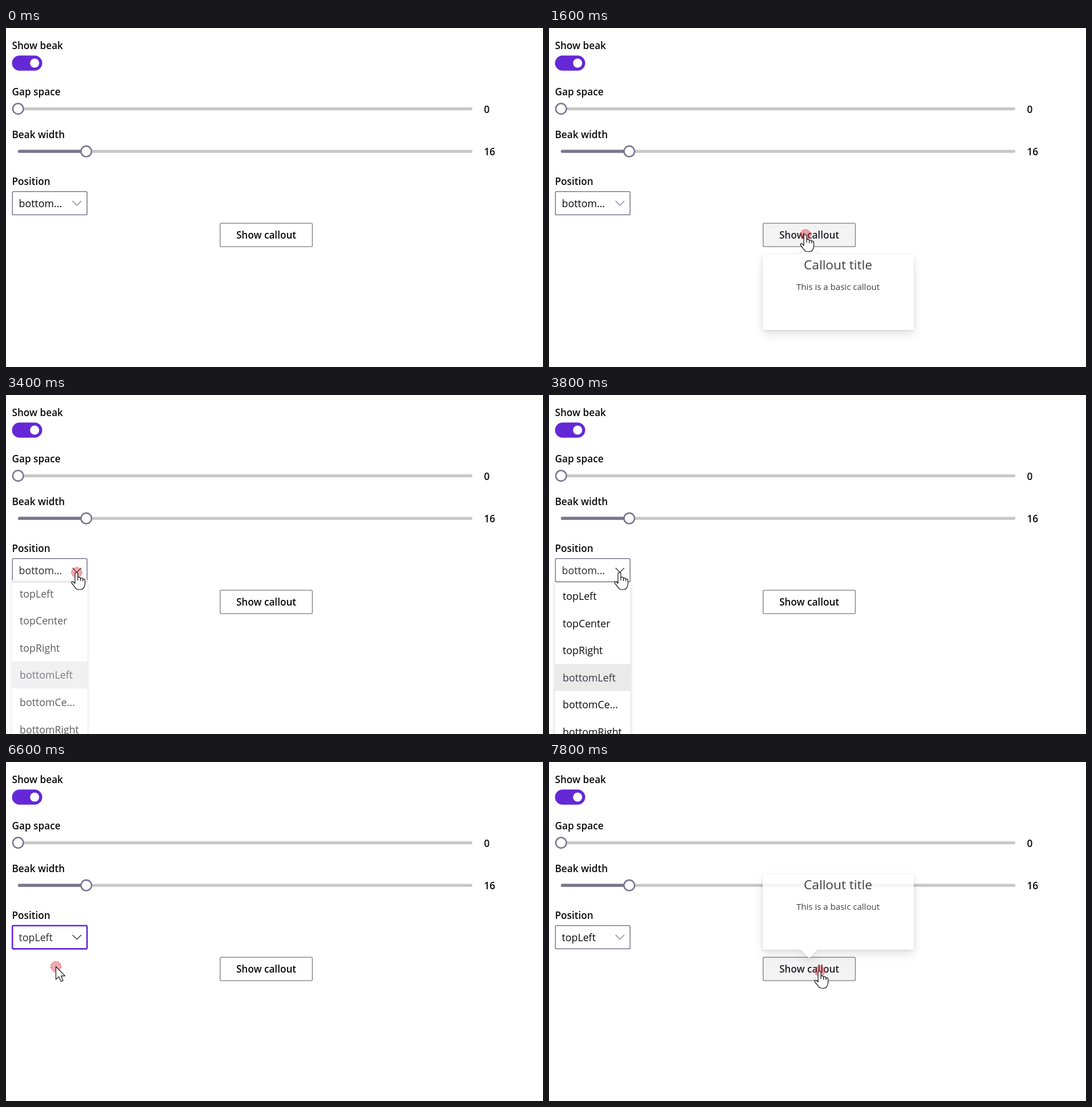
Write an HTML page that moves like this. It is 942 px wide and 594 px high and loops after 8000 ms.

```html
<!DOCTYPE html>
<html lang="en">
<head>
<meta charset="utf-8">
<title>Callout demo</title>
<style>
  html, body { margin: 0; height: 100%; overflow: hidden; background: #fff; }
  svg { display: block; font: 17.8px "Open Sans", "Noto Sans", sans-serif; fill: #0a0a0a; }
  .label { font-size: 17.2px; font-weight: 600; }
  .title { font-size: 22.65px; fill: #1c1b1f; }
  .body { font-size: 15.05px; fill: #1c1b1f; }
  .middle { text-anchor: middle; }
  .track { stroke: #c8c8c8; stroke-width: 5.3; stroke-linecap: round; }
  .filled { stroke: #79758f; }
  .thumb { fill: #fff; stroke: #79758f; stroke-width: 2.6; }
  .cursor { fill: #fff; stroke: #111; stroke-width: 1.2; stroke-linejoin: round; }
  #list { filter: drop-shadow(0 3px 3px rgba(0,0,0,.14)) drop-shadow(0 0 1px rgba(0,0,0,.14)); }
  #callout { filter: drop-shadow(0 8px 9px rgba(0,0,0,.13)) drop-shadow(0 1px 2px rgba(0,0,0,.12)); }
</style>
</head>
<body>
<svg width="942" height="594" viewBox="0 0 942 594">
  <g class="label">
    <text x="10.5" y="37">Show beak</text>
    <text x="10.5" y="118.3">Gap space</text>
    <text x="10.5" y="193">Beak width</text>
    <text x="10.5" y="274.5">Position</text>
    <text x="838.5" y="148.7">0</text>
    <text x="838.5" y="223.3">16</text>
  </g>

  <rect x="10.5" y="48.3" width="53" height="26.4" rx="13.2" fill="#6428d6"/>
  <circle cx="50.2" cy="61.5" r="8" fill="#fff"/>

  <path class="track" d="M23.5 141.6H815.5M23.5 216.2H815.5"/>
  <path class="track filled" d="M23.5 216.2H141"/>
  <circle class="thumb" cx="21.2" cy="141.6" r="9.3"/>
  <circle class="thumb" cx="140.8" cy="216.2" r="9.3"/>

  <rect id="box" x="11.2" y="286.7" width="131" height="40.7" rx="2" fill="#fff"/>
  <text id="value" x="22.5" y="314"></text>
  <path id="chevron" d="M116.8 303L124.4 310.6L132 303" fill="none" stroke-width="1.2"/>

  <rect id="button" x="375.6" y="342.1" width="161.8" height="41" rx="2" stroke="#7b7980" stroke-width="1.3"/>
  <text id="caption" class="label middle" x="456.5" y="369.3">Show callout</text>

  <g id="list"><rect x="10.5" y="328.2" width="132.5" height="290" fill="#fff"/></g>

  <g id="callout">
    <rect x="375" width="265" height="132.5" rx="2" fill="#fff"/>
    <path id="beak" fill="#fff"/>
    <text class="title middle" x="507" y="26">Callout title</text>
    <text class="body middle" x="507" y="62.5">This is a basic callout</text>
  </g>

  <g id="pointer">
    <circle id="click" r="9" fill="#dc1e2d" fill-opacity=".38" stroke="#d83c48" stroke-dasharray="3 2"/>
    <path id="arrow" class="cursor" d="M0 0V22.5L5.2 17.6L9 26L12.6 24.4L9 16.3H16Z"/>
    <path id="hand" class="cursor" d="M-3 2.5Q-3 0 -.5 0T2 2.5V9Q2.5 8 4.5 8.2Q6.5 8.5 6.5 10.5Q7 9.3 9 9.6Q10.8 10 10.8 12Q11.5 11 13 11.6Q14.5 12.2 14.5 14V20Q14.5 24 12.5 26.5Q11 30 5 30Q-1 30 -3 26Q-5 23 -8 19.5Q-10 17 -8.5 16Q-6.5 15 -3 19ZM2 9V14M6.5 10.5V15M10.8 12V15.5M-3 19V12"/>
  </g>
</svg>
<script>
const LOOP = 8000, STEP = 200, ROW = 47.6;
const $ = id => document.getElementById(id);
const set = (id, attrs) => { for (const k in attrs) $(id).setAttribute(k, attrs[k]); };
const show = (id, on) => set(id, { visibility: on ? "visible" : "hidden" });
const within = (t, from, to) => t >= from && t < to;

$("list").innerHTML += ["topLeft", "topCenter", "topRight", "bottomLeft", "bottomCe...", "bottomRight"]
  .map((name, i) => {
    const y = 328.4 + i * ROW;
    return `<rect id="row${i}" x="10.5" y="${y}" width="132.5" height="${ROW}" fill="${i === 3 ? "#eaeaea" : "#fff"}"/>
      <text x="24" y="${y + 30.6}" fill="${i === 3 ? "#3b3a45" : "#0a0a0a"}">${name}</text>`;
  }).join("");

// Pointer path: time, x, y
const path = [
  [200, 928, 277], [400, 800, 296], [600, 645, 328], [800, 510, 347], [1000, 442.5, 349.5], [1200, 450, 362],
  [2400, 450, 362], [2600, 327, 345], [2800, 215, 327], [3000, 142, 314], [3200, 124, 311],
  [5000, 124, 311], [5200, 104.5, 341], [5400, 87.5, 358.5],
  [6600, 87.5, 358.5], [6800, 185, 362], [7000, 365, 366], [7200, 475, 366.5], [LOOP, 475, 366.5]
];

function pointerAt(t) {
  const i = Math.max(1, path.findIndex(p => p[0] >= t));
  const [t0, x0, y0] = path[i - 1], [t1, x1, y1] = path[i];
  const k = Math.max(0, (t - t0) / (t1 - t0));
  return [x0 + (x1 - x0) * k, y0 + (y1 - y0) * k];
}

// Popups slide 26 px into place while fading in
const eased = (t, start) => 1 - (1 - Math.min(1, Math.max(0, (t - start) / 367))) ** 6.5;
function slideIn(id, t, start, y, from) {
  const rest = 1 - eased(t, start);
  set(id, { transform: `translate(0 ${y + from * rest})`, opacity: Math.max(0, 1 - 2 * rest) });
}

function render(now) {
  const t = Math.floor(now % LOOP / STEP) * STEP;
  const [x, y] = pointerAt(t);
  const listOpen = within(t, 3312, 6400), picked = t >= 6400;
  const focused = within(t, 6400, 7400);
  const onButton = t > 0 && x > 375 && x < 538 && y > 342 && y < 384;
  const onBox = x > 11 && x < 143 && y > 286 && y < 328;
  const onRow = listOpen && x < 143 && y > 328;

  show("pointer", t >= 200);
  set("pointer", { transform: `translate(${x} ${y})` });
  const hand = onButton || onBox || onRow;
  show("hand", t >= 200 && hand);
  show("arrow", t >= 200 && !hand);
  show("click", within(t, 1400, 1800) || [3200, 6200, 7400].some(c => within(t, c, c + 600)));

  set("button", { fill: onButton ? "#f3f3f3" : "#fff" });
  set("caption", { fill: onButton ? "#24232a" : "#0a0a0a" });
  set("box", { stroke: focused ? "#6428d6" : "#64617c", "stroke-width": focused ? 2.6 : 1.3 });
  set("chevron", { stroke: onBox || focused ? "#24232a" : "#79758f" });
  set("value", { fill: onBox || focused ? "#2c2b33" : "#0a0a0a" });
  $("value").textContent = picked ? "topLeft" : "bottom...";

  show("list", listOpen);
  slideIn("list", t, 3312, 0, -26);
  set("row0", { fill: onRow ? "#f3f3f3" : "#fff" });

  const above = t >= 7685;
  show("callout", above || within(t, 1480, 3300));
  set("beak", { d: above ? "M441.5 132L456.5 147.5L471.5 132Z" : "M441.5 .5L456.5 -14.5L471.5 .5Z" });
  if (above) slideIn("callout", t, 7685, 194.3, 26);
  else slideIn("callout", t, 1480, 398.5, -26);
}

const start = performance.now();
function tick() {
  render(performance.now() - start);
  requestAnimationFrame(tick);
}
tick();
</script>
</body>
</html>
```
